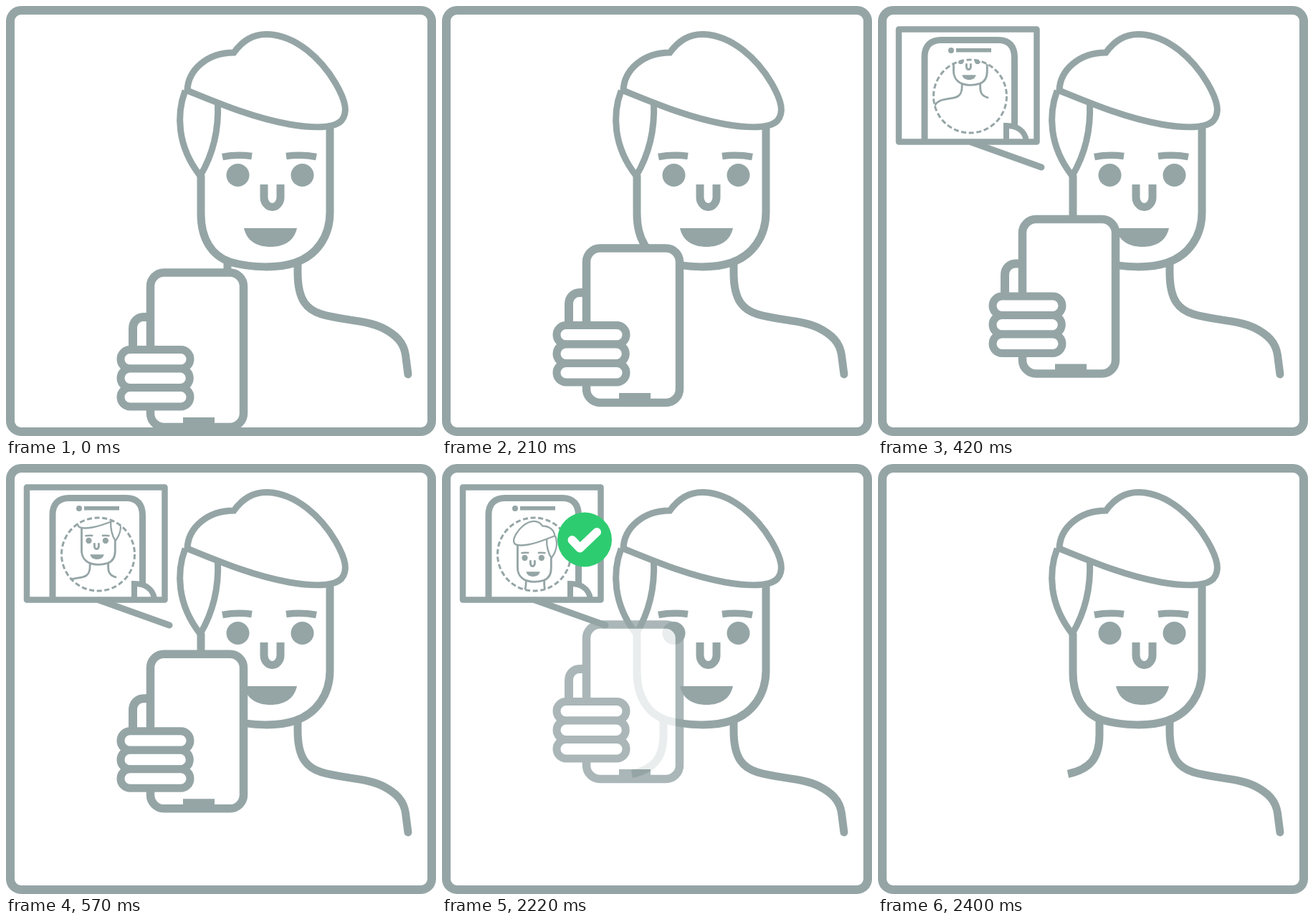
Animation of 600 by 600 pixels, one loop 2.67 s. Source, as an HTML page with a canvas:

```html
<!DOCTYPE html>
<html lang="en">
<head>
<meta charset="utf-8">
<title>Face scan</title>
<style>
  html, body { margin: 0; width: 100%; height: 100%; overflow: hidden; background: #fff; }
  canvas { display: block; width: 100vmin; height: 100vmin; }
</style>
</head>
<body>
<canvas id="stage" width="600" height="600"></canvas>
<script>
const SIZE = 600, LOOP = 2670, STEP = 30;
const GREY = '#95a5a6', GREEN = '#2ecc71';

const stage = document.getElementById('stage').getContext('2d');
const layer = document.createElement('canvas');
layer.width = layer.height = SIZE;
const layerCtx = layer.getContext('2d');

const shapes = {
  face: 'M272 236V290C272 325 287 348 312 357C343 366 381 366 404 358C433 348 452 322 452 288V168',
  neck: 'M309 357V378C309 410 296 426 265 432.5',
  shoulder: 'M407 357V372C407 412 421 424 440 430C470 439 503 438 525 449C545 459 555 470 557.5 487L561 514',
  sideHair: 'M250 118C238 150 238 195 271 237C290 205 297 170 295.5 135',
  hair: 'M253 118C254 88 282 65 318 65C333 44 350 39 365 39.5C405 41 440 74 460 108C475 134 477 149 468 160C456 172 425 170 395 165C345 156 300 137 253 118Z',
  brows: 'M302 210.5Q322 206.5 343 209.5M391 209.5Q412 206.5 433 210.5',
  nose: 'M360 249V267A11.5 13.5 0 0 0 383 267V249',
  mouth: 'M332 310H406C402 328 388 336 369 336C350 336 336 328 332 310Z',
  thumb: 'M177 332V302C177 292 184 286 192 286H201',
  miniPhone: 'M65 188V71C65 55 74 47.5 88 47.5H168C183 47.5 190.5 56 190.5 72V188',
  miniThumb: 'M179 188V167C195 167 205 175 207 188',
  pointer: 'M130 190L228 225',
  tick: 'M181.5 106L192.5 117.5L216 95'
};
for (const name in shapes) shapes[name] = new Path2D(shapes[name]);

const clamp = x => Math.max(0, Math.min(1, x));
const ramp = (t, start, length) => clamp((t - start) / length);

function line(c, path, width, color = GREY, cap = 'butt') {
  c.lineWidth = width;
  c.strokeStyle = color;
  c.lineCap = cap;
  c.stroke(path);
}

function fill(c, path, color = GREY) {
  c.fillStyle = color;
  c.fill(path);
}

function ellipse(x, y, rx, ry = rx) {
  const path = new Path2D();
  path.ellipse(x, y, rx, ry, 0, 0, Math.PI * 2);
  return path;
}

function box(x, y, w, h, r) {
  const path = new Path2D();
  path.roundRect(x, y, w, h, r);
  return path;
}

// Paints a group and blends it onto the stage as a whole.
function group(alpha, paint) {
  if (alpha <= 0) return;
  layerCtx.clearRect(0, 0, SIZE, SIZE);
  layerCtx.save();
  paint(layerCtx);
  layerCtx.restore();
  stage.globalAlpha = alpha;
  stage.drawImage(layer, 0, 0);
  stage.globalAlpha = 1;
}

function drawPerson(c, eyeOpen) {
  line(c, shapes.neck, 11);
  line(c, shapes.shoulder, 11, GREY, 'round');
  line(c, shapes.face, 11);
  line(c, shapes.sideHair, 9);
  fill(c, shapes.hair, '#fff');
  line(c, shapes.hair, 9);
  line(c, shapes.brows, 9.5);
  for (const x of [323.5, 413.5]) fill(c, ellipse(x, 236, 16, 16 * eyeOpen));
  line(c, shapes.nose, 11);
  fill(c, shapes.mouth);
}

function drawInset(c, shift) {
  line(c, shapes.pointer, 9, GREY, 'round');
  line(c, shapes.miniPhone, 9);
  fill(c, shapes.miniThumb, '#fff');
  line(c, shapes.miniThumb, 8);
  c.lineJoin = 'round';
  line(c, box(29, 32.5, 192.5, 157, 0), 8.5);
  c.lineJoin = 'miter';
  fill(c, ellipse(102, 62, 4));
  fill(c, box(109, 59, 49, 5.5, 0));

  const ring = ellipse(128.5, 126, 51);
  c.save();
  c.clip(ring);
  c.translate(223, 69.6 + shift);
  c.scale(-0.26, 0.26);
  drawPerson(c, 1);
  c.restore();

  const period = 2 * Math.PI * 51 / 30;
  c.setLineDash([period * 0.66, period * 0.34]);
  line(c, ring, 3);
  c.setLineDash([]);
}

function drawPhone(c, drop) {
  c.translate(0, drop);
  fill(c, shapes.thumb, '#fff');
  line(c, shapes.thumb, 12);
  const body = box(201.5, 224, 130, 215.5, 19);
  fill(c, body, '#fff');
  line(c, body, 11.5);
  fill(c, box(247, 426, 44, 12, 0));
  for (let i = 0; i < 3; i++) {
    const inset = i === 1 ? 0.7 : 0;
    const finger = box(160, 331.5 + i * 26.5, 97 - inset, 26.5, 13.2);
    fill(c, finger, '#fff');
    line(c, finger, 11);
  }
}

function drawCheck(c) {
  fill(c, ellipse(199, 105.5, 38), GREEN);
  c.lineJoin = 'round';
  line(c, shapes.tick, 12, '#fff', 'round');
}

function draw(t) {
  const rise = clamp(t / 750);
  const drop = 148 * (1 - rise * (0.731 + 0.339 * rise - 0.07 * rise * rise));
  const left = Math.max(0, 750 - t);
  const shift = -(0.097 * left + 0.000202 * left * left);
  const blink = clamp(1 - Math.abs(t - 315) / 75);
  const insetAlpha = ramp(t, 240, 150) * (1 - ramp(t, 2250, 150));
  const phoneAlpha = 1 - ramp(t, 2190, 150);

  stage.fillStyle = '#fff';
  stage.fillRect(0, 0, SIZE, SIZE);
  drawPerson(stage, 1 - 0.9 * blink);
  group(insetAlpha, c => drawInset(c, shift));
  group(phoneAlpha, c => drawPhone(c, drop));
  group(insetAlpha * ramp(t, 600, 150), drawCheck);
  line(stage, box(6, 6, 588, 588, 15), 12);
}

const start = performance.now();
function tick() {
  const t = (performance.now() - start) % LOOP;
  draw(Math.floor(t / STEP) * STEP);
  requestAnimationFrame(tick);
}
tick();
</script>
</body>
</html>
```
